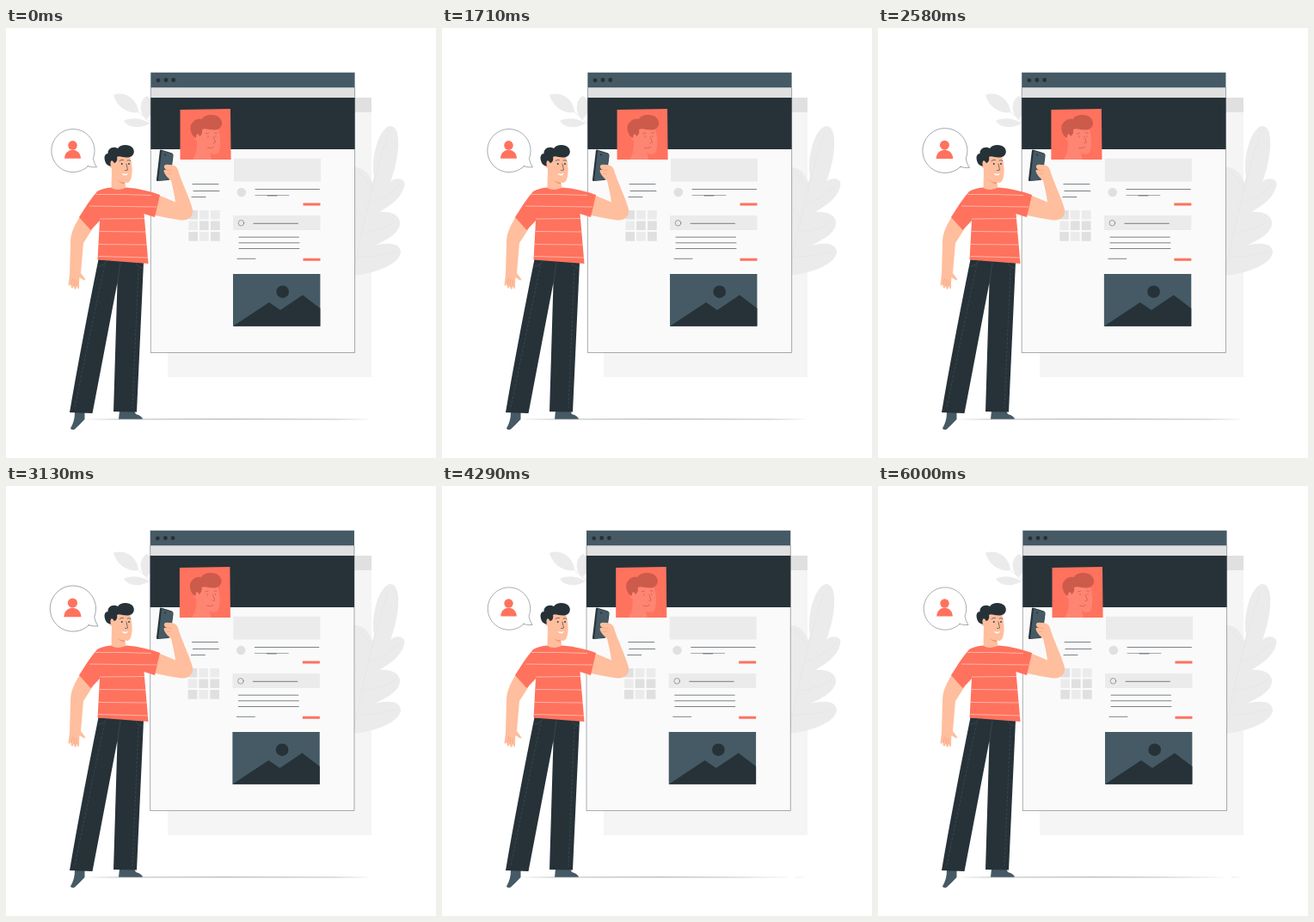
These frames come from a looping animation (500x500 px, 6040 ms). An HTML page without scripts:

```html
<!DOCTYPE html>
<html lang="en">
<head>
<meta charset="utf-8">
<title>Profile page</title>
<style>
  @property --f { syntax: "<number>"; inherits: false; initial-value: 0; }
  @property --s { syntax: "<number>"; inherits: false; initial-value: 1; }

  html, body { margin: 0; width: 100%; height: 100%; overflow: hidden; background: #fff; }
  svg { display: block; width: 100%; height: 100%; }

  .ink { fill: #263238; }
  .slate { fill: #455a64; }
  .coral { fill: #ff725e; }
  .skin { fill: #ffbe9d; }
  .pale { fill: #ebebeb; }
  .grey { fill: #e0e0e0; }
  .line { fill: none; stroke: #263238; stroke-width: .6; stroke-linecap: round; stroke-linejoin: round; }
  .thin { stroke-width: .4; }
  .vein { fill: none; stroke: #e0e0e0; stroke-width: .5; }
  .stripe { fill: none; stroke: #ffd0c6; stroke-width: .7; }
  .crease { fill: none; stroke: #eb996e; stroke-width: .5; }
  .seam { fill: none; stroke: #455a64; stroke-width: .5; }
  .dash { stroke-dasharray: 3 2; }

  /* 36 ticks per shake, four shakes, then one tick of rest */
  .window {
    --u: calc(5 - max((var(--f) + .8) / 3.6 - 5, 5 - (var(--f) + .8) / 3.6));
    --x: calc(-1 * var(--u)
      + 4 * max(0, var(--u) - 1)
      - 9 * max(0, var(--u) - 2)
      + 14 * max(0, var(--u) - 3)
      - 16 * max(0, var(--u) - 4));
    transform: translateX(calc(var(--x) * 1px));
    animation: tick 6.04s steps(36) -8ms infinite;
  }
  @keyframes tick {
    0%, 24.8276%, 49.6552%, 74.4828%, 99.3104%, 100% { --f: 0; }
    24.8275%, 49.6551%, 74.4827%, 99.3103% { --f: 36; }
  }

  .bubble {
    transform-origin: 79px 143px;
    transform: scale(var(--s));
    animation: pulse 6.04s linear infinite;
  }
  @keyframes pulse {
    0% { --s: 1.015; }
    11.9%, 49.7% { --s: 1.1; }
    31.5%, 35.1%, 59.3%, 100% { --s: 1; }
  }
</style>
</head>
<body>
<svg viewBox="0 0 500 500" xmlns="http://www.w3.org/2000/svg">
  <!-- backdrop -->
  <path fill="#f5f5f5" d="M188 81H425V406H188z"/>
  <path class="grey" d="M188 81H425V98H188z"/>

  <g class="pale">
    <path d="M428 173C424 151 433 118 446 114C461 113 458 150 447 179C452 173 466 174 463 184C460 198 446 207 434 214C446 213 459 217 458 228C456 240 441 247 429 253C444 249 459 250 459 261C457 276 424 287 400 288V162C411 160 422 166 426 180z"/>
    <path d="M154 98C146 100 130 95 125 78C137 73 153 82 154 98z"/>
    <path d="M163 106C154 99 155 83 164 79C173 85 173 99 163 106z"/>
    <path d="M137 108C145 103 160 105 167 111C157 117 143 117 137 108z"/>
  </g>
  <path class="vein" d="M404 284C413 238 428 172 444 124M427 188L409 165M423 204Q444 197 458 183M415 238Q438 235 453 225M409 266Q434 266 454 260M418 222L404 206"/>
  <path fill="none" stroke="#ebebeb" d="M128 80Q152 94 170 112M163 84V107"/>

  <path class="ink" opacity=".6" d="M88 455Q250 454.200 427 455Q250 455.700 88 455z"/>

  <!-- browser window -->
  <g class="window"><g transform="translate(.2)">
    <path fill="#fafafa" d="M168.300 141H405.600V377.500H168.300z"/>
    <path class="slate" d="M168.300 51.700H405.600V69.500H168.300z"/>
    <path class="grey" d="M168.300 69.500H405.600V81H168.300z"/>
    <path class="ink" d="M168.300 81H405.600V141H168.300z"/>
    <path class="line thin" d="M168.300 69.500V377.500H405.600V69.500"/>
    <g class="ink">
      <circle cx="177" cy="60.800" r="2.400"/>
      <circle cx="186" cy="60.500" r="2.400"/>
      <circle cx="194.700" cy="60.500" r="2.400"/>
    </g>

    <!-- avatar -->
    <path class="coral" d="M202.500 95L261 94L261.600 153H202.500z"/>
    <path fill="#ff8573" d="M222 120C230 114 242 116 247 118C250 128 250 139 247 145C244 148 240 147 237 145L239 153H217C221 147 222.500 140 222 131C218 130 218 124 222 124z"/>
    <path fill="#cc5b4b" d="M218 126C214 121 213 113 217 110C219 106 225 105 228 106C230 101 242 99 248 104C254 110 251 117 244 118.500C237 119 232 116 228 118C229 122 227 125 225 126C224 122 221 122 221 128z"/>
    <path fill="none" stroke="#cc5b4b" stroke-width=".7" d="M232 123l4-1M242 122l4 0M241 126l2.500 7-3 1M234 139q5 2 8-1M235 125v2.500M244 125v2"/>

    <!-- side column -->
    <path class="line" d="M217 181.500H247M218 189.500H248M216 196.500H232"/>
    <path class="pale" d="M225 212h10.700v10.500h-10.700zM238 212h10.700v10.500h-10.700zM212.300 224.500h10.700v10.500h-10.700zM225 237h10.700v10.700h-10.700z"/>
    <path class="grey" d="M212.300 212h10.700v10.500h-10.700zM225 224.500h10.700v10.500h-10.700zM238 224.500h10.700v10.500h-10.700zM212.300 237h10.700v10.700h-10.700zM238 237h10.700v10.700h-10.700z"/>

    <!-- posts -->
    <path class="pale" d="M265 151.800H366V178.500H265zM264 218H365.500V235H264z"/>
    <circle class="grey" cx="273.800" cy="191" r="5.300"/>
    <path class="line" d="M290 187.500H364.500M304 195H315"/>
    <path class="line thin" d="M290 194.500H329"/>
    <circle class="line thin" cx="273.500" cy="226.800" r="3.300"/>
    <path class="line" d="M288 227.300H339.500M271 243.200H340.500M271 249.800H341M271 256.500H341M269 268.300H290"/>
    <path class="coral" d="M345.500 203.400H365.500V206.400H345.500zM345.500 267.700H365.500V270.700H345.500z"/>
    <path class="slate" d="M264 286H365.400V346.800H264z"/>
    <path class="ink" d="M264 346.800L306 319L319 328L345 310.500L365.400 326V346.800z"/>
    <circle class="ink" cx="321.700" cy="306.700" r="7.300"/>
  </g></g>

  <!-- speech bubble -->
  <g class="bubble">
    <path class="line thin" style="fill:#fff" d="M95 160.500A24.700 24.700 0 1 1 101 151.500Q102 157 105 161.500Q100 162 95 160.500z"/>
    <circle class="coral" cx="77.500" cy="136.500" r="5.200"/>
    <path class="coral" d="M68.200 151.500C68.500 138.500 86.500 138.500 86.800 151.500z"/>
  </g>

  <!-- legs -->
  <path class="slate" d="M80 447H91.500V455Q85 462 80 466.500Q76 468 75 465.500Q80 457 80 447zM132 445H149L151 449Q158 451 159 454.700H131z"/>
  <path class="ink" d="M107.500 269L160 272.500L152 446.500L125 446L129.500 296L100.500 448L74 447C83 394 95 331 107.500 269z"/>
  <path class="seam dash" d="M80 441L115 274M154 280L147 442"/>
  <path class="seam" d="M129.500 299Q131 285 133 273M107 277Q114 277 117 271M151 273Q152 278 159 279"/>

  <!-- arm at rest -->
  <path class="skin" d="M86 219C78 232 75 240 75 250L74 286L72.500 299Q73.500 301 75 298L76 302Q78 304 78.500 300L80 303.500Q82 305 82 300L84 303.500Q85.500 303 85 298L85.500 290L91 293.500Q93 293 91.500 291L87 285L90 250L101 233z"/>
  <path class="crease" d="M76 298L77.500 291M79 300L79.500 292M82 300V293"/>

  <!-- phone and raised arm -->
  <path class="ink" d="M179 142Q180 141 182 142L193 145.500Q195 146.500 194.500 149L191 175Q190.500 177 188 177L176 178Q174.500 178 175 176z"/>
  <path class="slate" d="M181 142.500L193.500 146.500Q194.500 147 194 149L190.500 175Q190 176.500 188 176.500L177 177.500z"/>
  <circle class="ink" cx="185" cy="147.500" r="1"/>
  <path class="skin" d="M172 192L197 202.500C196 194 194 186 192 177.500C188 174 184 170 183.500 166Q184 164 187 165Q183 163 184 160Q186 158 190 159C195 159 199 161 200 165C204 179 212 194 216.500 209C219 218 213 224 204 223.500C193 222 182 220 170 217z"/>
  <path class="crease" d="M186 164.800Q190 166 193 165M187 169Q190 170 192 169"/>

  <!-- shirt -->
  <path class="coral" d="M122 185.500Q131 188 140 185.500Q160 187 179 194L173 220L160.500 216L165.500 274L106.500 269.500L109 224L98.500 235L85 220C92 209 98 199 106 190Q113 186 122 185.500z"/>
  <path class="stripe" d="M104 193.500Q135 193 169 194.500M97 207L175 208M109 222L161 221.500M109 236.500L162 237M108 251.500L163.500 252M107.500 265.500L165 267"/>

  <!-- head -->
  <path class="skin" d="M122 153C130 148 139 147 144 149C146 156 147.500 165 146 172C145 179 142 181 138 179.500L139.500 185.500Q131 190 122.500 186L123 163C118 161 118 154 122 153z"/>
  <path fill="#eb996e" d="M130 177Q134 180 138 179.500L138.500 181.500Q133 181 130 177z"/>
  <path class="ink" d="M116 157C113 150 115 146 118.500 146C118 140 125 137 130 140C133 135 143 135 147 139C151 144 148 150 142 150.500C136 151 132 148 129 150C130 154 128 157 125.500 157C124 152 120 154 122 160.500C119 160.500 117.500 159 116 157z"/>
  <path class="line" d="M132 154.500Q134 152.500 136.500 153.500M141 154Q143 153 145 154.500M140 158L141.500 165Q140 166 138.500 165.500"/>
  <circle class="ink" cx="134.700" cy="158" r=".9"/>
  <circle class="ink" cx="143" cy="158" r=".9"/>
  <path fill="#fff" d="M134 169Q138 170.500 142 169Q139 174 134 169z"/>
</svg>
</body>
</html>
```
